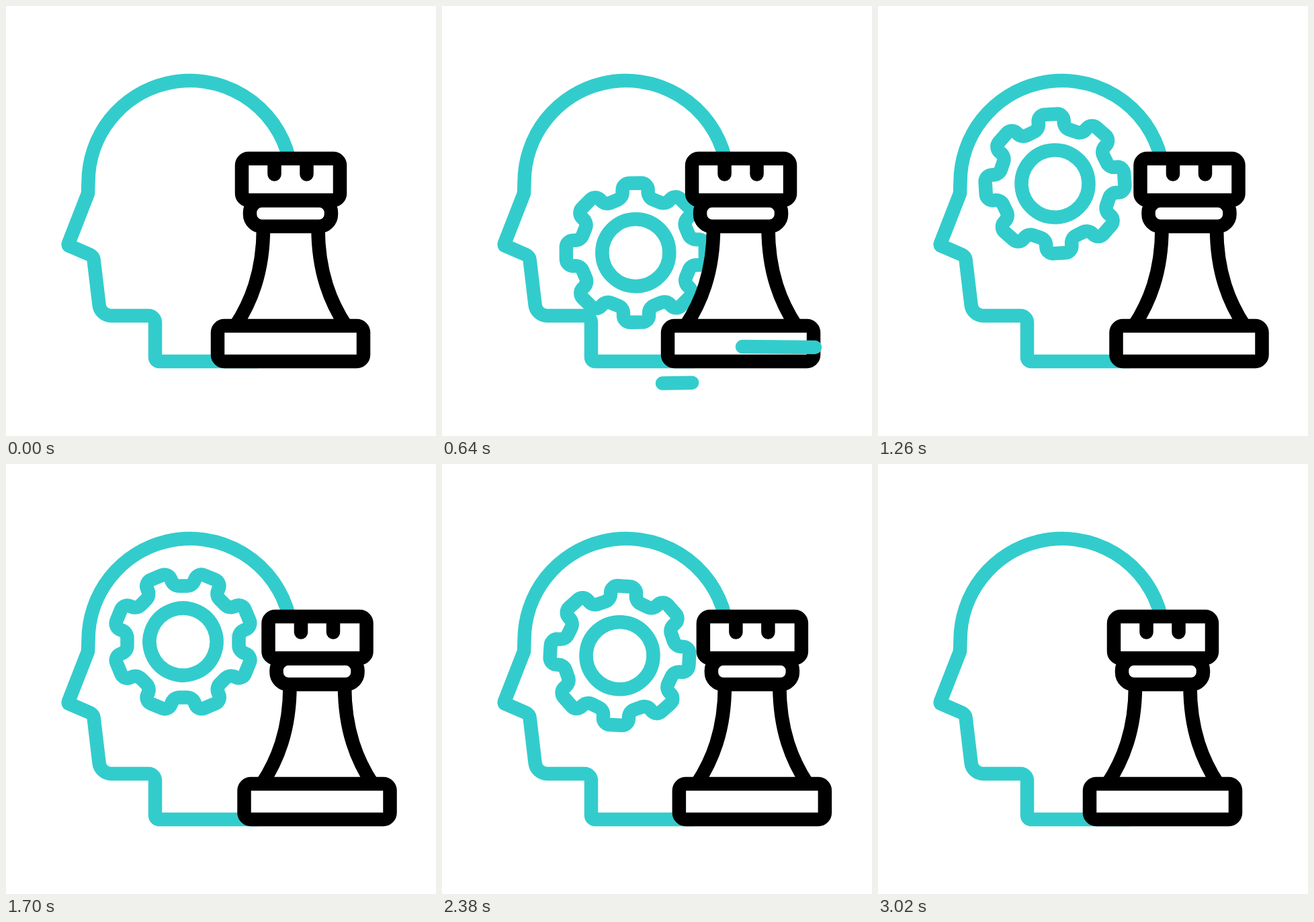
An HTML page with a canvas for the animation above (3.12 s loop, 640 by 640 pixels).

```html
<!DOCTYPE html>
<html lang="en">
<head>
<meta charset="utf-8">
<title>Strategic thinking</title>
<style>
  html, body { margin: 0; width: 100%; height: 100%; overflow: hidden; background: #fff; }
  canvas { display: block; width: 640px; height: 640px; }
</style>
</head>
<body>
<canvas id="stage" width="640" height="640"></canvas>
<script>
const LOOP = 3120;
const TEAL = '#33cccc';
const BLACK = '#000';
const ctx = document.getElementById('stage').getContext('2d');

// Keys are [ms, value]; the curve is smooth, monotone and rests at both ends.
function track(keys) {
  const rate = i => (keys[i + 1][1] - keys[i][1]) / (keys[i + 1][0] - keys[i][0]);
  const slopes = keys.map((k, i) => {
    if (i === 0 || i === keys.length - 1) return 0;
    const a = rate(i - 1), b = rate(i);
    return a * b > 0 ? 2 * a * b / (a + b) : 0;
  });
  return t => {
    if (t <= keys[0][0]) return keys[0][1];
    const i = keys.findIndex(k => k[0] > t) - 1;
    if (i < 0) return keys[keys.length - 1][1];
    const [t0, v0] = keys[i], [t1, v1] = keys[i + 1];
    const d = t1 - t0, u = (t - t0) / d, s = u * u * (3 - 2 * u);
    return v0 + (v1 - v0) * s
      + d * u * (1 - u) * (slopes[i] * (1 - u) - slopes[i + 1] * u);
  };
}

const motion = {
  rookX: track([[380, 0], [880, 39.5], [2320, 39.5], [2820, 0]]),
  // 1 = behind the rook, 0 = centred in the head
  gearAway: track([[180, 1], [640, 0.479], [900, 0], [2280, 0], [2380, 0.095], [2840, 1]]),
  gearSize: track([[180, 0], [560, 1], [2620, 1], [2960, 0]]),
  gearTurn: track([[600, 0], [900, -14.5], [1260, -48.5], [1700, -112.5], [2380, -176.5], [2480, -180]])
};

const streaks = [
  { from: [328, 561.5], to: [515, 558], head: track([[540, 0], [860, 1]]), tail: track([[640, 0], [1000, 1]]) },
  { from: [447, 507], to: [555, 508], head: track([[440, 0], [640, 1]]), tail: track([[640, 0], [840, 1]]) }
];

// Appends corners [x, y, radius] to a path.
function corners(path, points) {
  for (let i = 0; i < points.length - 1; i++) {
    const [x, y, r] = points[i], [nx, ny] = points[i + 1];
    path.arcTo(x, y, nx, ny, r);
  }
  const [x, y] = points[points.length - 1];
  path.lineTo(x, y);
}

function box(x, y, w, h, r) {
  const path = new Path2D();
  path.roundRect(x, y, w, h, r);
  return path;
}

function buildHead() {
  const path = new Path2D();
  path.arc(274, 262.5, 151.5, -0.235, Math.PI, true);
  path.lineTo(122, 279);
  corners(path, [
    [92, 356, 2], [130, 372.5, 10], [140.5, 461, 18],
    [222, 461, 10], [222, 529, 6], [375, 529, 0]
  ]);
  return path;
}

function buildGear(teeth = 8) {
  const path = new Path2D();
  const points = [];
  const profile = [[-19, -82, 12], [-19, -103.5, 10], [19, -103.5, 10], [19, -82, 12]];
  for (let i = 0; i < teeth; i++) {
    const a = i * 2 * Math.PI / teeth, c = Math.cos(a), s = Math.sin(a);
    for (const [x, y, r] of profile) points.push([x * c - y * s, x * s + y * c, r]);
  }
  const last = points[points.length - 1], first = points[0];
  const start = [(last[0] + first[0]) / 2, (last[1] + first[1]) / 2, 0];
  path.moveTo(start[0], start[1]);
  corners(path, [...points, start]);
  path.closePath();
  path.moveTo(50, 0);
  path.arc(0, 0, 50, 0, 2 * Math.PI);
  return path;
}

const head = buildHead();
const gear = buildGear();
const rook = {
  body: new Path2D('M383 330C383 397 364 442 341 477H506.5C483.5 442 464.5 397 464.5 330'),
  parts: [
    box(363, 289.5, 121, 38.5, 18),
    box(351, 227, 146, 62, 10),
    box(315, 476, 217, 53, 10)
  ],
  slots: new Path2D('M399.5 228V250.5M447.5 228V250.5')
};

function stroke(path, color, cap = 'butt') {
  ctx.strokeStyle = color;
  ctx.lineCap = cap;
  ctx.stroke(path);
}

function drawGear(t) {
  const size = motion.gearSize(t), q = motion.gearAway(t);
  if (size < 0.01) return;
  ctx.save();
  ctx.translate(263.5 + 109 * q * q, 264.5 + 215 * q);
  ctx.rotate(motion.gearTurn(t) * Math.PI / 180);
  ctx.scale(size, size);
  stroke(gear, TEAL);
  ctx.restore();
}

function drawRook(t) {
  ctx.save();
  ctx.translate(motion.rookX(t), 0);
  ctx.fillStyle = '#fff';
  for (const part of [rook.body, ...rook.parts]) {
    ctx.fill(part);
    stroke(part, BLACK);
  }
  stroke(rook.slots, BLACK, 'round');
  ctx.restore();
}

function drawStreak({ from, to, head, tail }, t) {
  const a = tail(t), b = head(t);
  if (b - a < 0.005) return;
  const at = u => from.map((v, i) => v + (to[i] - v) * u);
  const path = new Path2D();
  path.moveTo(...at(a));
  path.lineTo(...at(b));
  stroke(path, TEAL, 'round');
}

function draw(t) {
  ctx.fillStyle = '#fff';
  ctx.fillRect(0, 0, 640, 640);
  ctx.lineWidth = 20.5;
  ctx.lineJoin = 'round';
  stroke(head, TEAL);
  drawGear(t);
  drawRook(t);
  streaks.forEach(s => drawStreak(s, t));
}

const begin = performance.now();
function tick() {
  draw((performance.now() - begin) % LOOP);
  requestAnimationFrame(tick);
}
tick();
</script>
</body>
</html>
```
